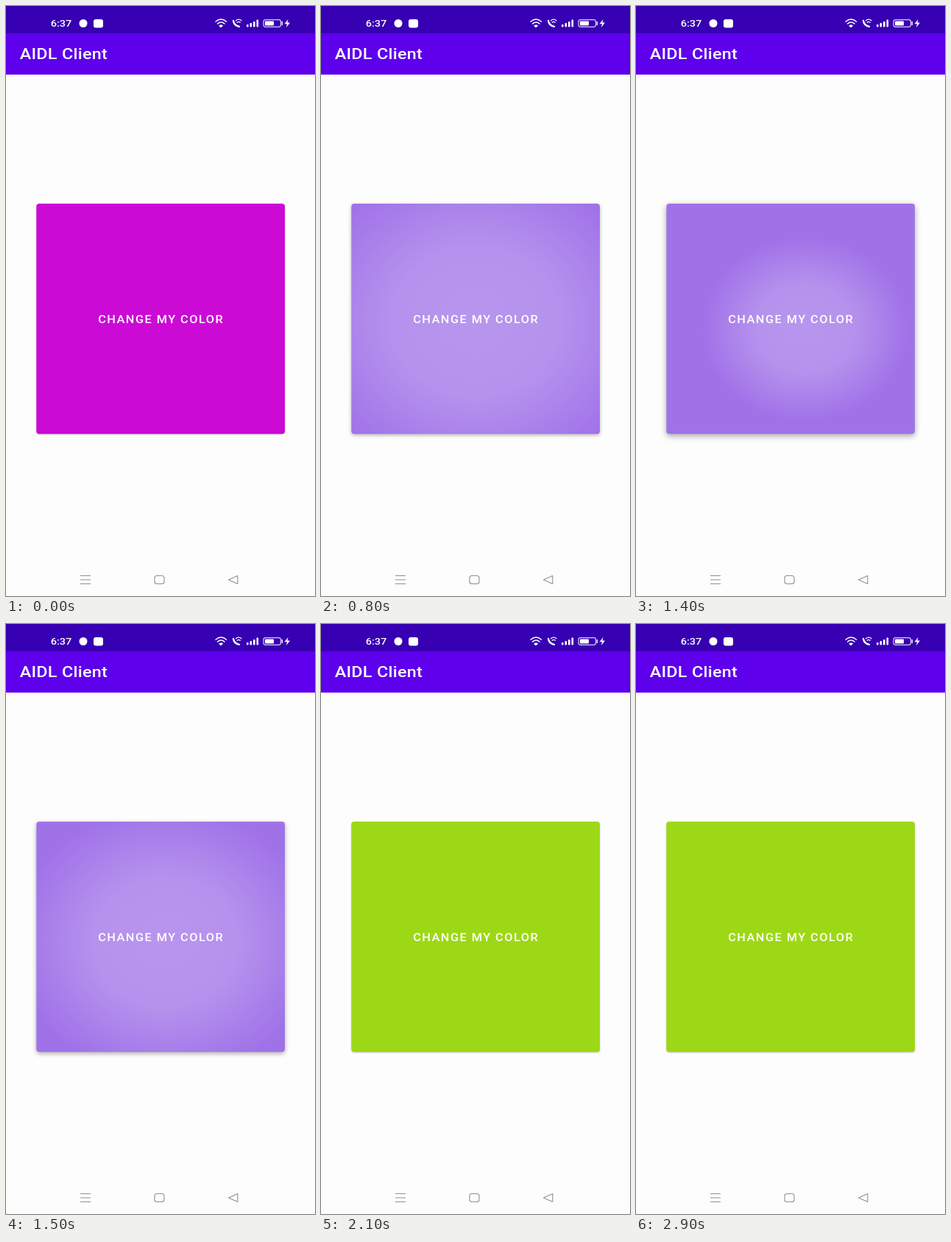
Animation, 420 px wide and 800 px high, one loop 3 s. Source, as an HTML page:

```html
<!DOCTYPE html>
<html lang="en">
<head>
<meta charset="utf-8">
<title>AIDL Client</title>
<style>
  html, body { margin: 0; width: 100%; height: 100%; overflow: hidden; background: #fdfdfd; }
  svg { display: block; width: 100vw; height: 100vh; }
  text { font-family: Roboto, sans-serif; font-weight: 500; fill: #fff; }
  .line { fill: none; stroke: #fff; stroke-width: 1.4; stroke-linecap: round; }
  .nav { fill: none; stroke: #909090; stroke-width: 1.1; stroke-linejoin: round; }
</style>
</head>
<body>
<svg viewBox="0 0 420 800" preserveAspectRatio="none">
  <defs>
    <radialGradient id="glow">
      <stop offset="0" stop-color="#fff"/>
      <stop offset=".48" stop-color="#fff" stop-opacity=".9"/>
      <stop offset="1" stop-color="#fff" stop-opacity="0"/>
    </radialGradient>
    <clipPath id="face"><rect x="41.3" y="268" width="337.7" height="312.2" rx="4"/></clipPath>
    <filter id="soft" x="-10%" y="-10%" width="120%" height="120%"><feGaussianBlur id="blur" stdDeviation="1"/></filter>
  </defs>

  <rect width="420" height="800" fill="#fdfdfd"/>
  <rect width="420" height="37" fill="#3700b3"/>
  <rect y="37" width="420" height="56" fill="#5e00eb"/>

  <!-- status bar -->
  <circle cx="105" cy="23.5" r="5.5" fill="#fff"/>
  <rect x="119" y="18" width="13" height="11.5" rx="3" fill="#fff"/>
  <g class="line">
    <path d="M285 21.3Q292.3 14.9 299.6 21.3M287.5 24.1Q292.3 20 297.1 24.1"/>
    <path d="M290 26.7Q292.3 24.8 294.6 26.7L292.3 28.6Z" fill="#fff" stroke-width="1"/>
    <path d="M309 20Q310 26.5 317 27.8" stroke-width="2.3"/>
    <path d="M312.5 19.8Q316.2 16.6 320 19.8M314.2 22.3Q316.2 20.6 318.2 22.3" stroke-width="1.2"/>
  </g>
  <g id="bars" fill="#fff"></g>
  <rect x="350" y="18.7" width="23.5" height="9.6" rx="2.8" fill="none" stroke="#d8ccf0" stroke-width="1.2"/>
  <rect x="352" y="20.5" width="12" height="6" rx="1" fill="#fff"/>
  <path d="M375.3 21.5v4" class="line"/>
  <path d="M383.5 18L378.5 24.3H382L381 29L386 22.5H382.5Z" fill="#fff"/>

  <!-- the screen is 360 wide, shown at 420 -->
  <g transform="scale(1.16667 1)">
    <text x="52" y="28" font-size="12.5">6:37</text>
    <text x="16" y="72" font-size="20" letter-spacing=".25">AIDL Client</text>
  </g>

  <!-- button -->
  <rect id="shadow" x="41.3" y="268" width="337.7" height="312.2" rx="4" filter="url(#soft)"/>
  <rect id="button" x="41.3" y="268" width="337.7" height="312.2" rx="4"/>
  <g clip-path="url(#face)"><ellipse id="ripple" fill="url(#glow)"/></g>
  <g transform="scale(1.16667 1)">
    <text x="107.3" y="430" font-size="14" letter-spacing="1.25">CHANGE MY COLOR</text>
  </g>

  <!-- navigation -->
  <path class="nav" d="M101 772.5h14M101 778h14M101 783.5h14"/>
  <rect class="nav" x="202" y="772.5" width="13" height="11" rx="3"/>
  <path class="nav" d="M302.5 778L314.8 772.5V783.5Z"/>
</svg>
<script>
const LOOP = 3000, STEP = 100;
const PRESSES = [500, 1250];
const COLORS = [[0, '#cc0ad6'], [700, '#a072e8'], [1600, '#9dd816']];

const $ = id => document.getElementById(id);
const clamp = v => Math.max(0, Math.min(1, v));
const set = (id, attrs) => {
  for (const key in attrs) $(id).setAttribute(key, attrs[key]);
};

$('bars').innerHTML = [3.5, 5.5, 7.5, 10].map((h, i) =>
  `<rect x="${327 + i * 4.5}" y="${28.5 - h}" width="2.6" height="${h}" rx=".9"/>`).join('');

function draw(t) {
  const color = COLORS.filter(c => c[0] <= t).pop()[1];
  const press = PRESSES.filter(p => p <= t).pop();
  const age = press === undefined ? LOOP : t - press;

  const grow = clamp(age / 300);
  const radius = 40 + age * 0.63;
  const alpha = 0.25 * clamp((530 - age) / 200);
  const lift = clamp((age + 50) / 100) * clamp((400 - age) / 200);

  set('button', { fill: color });
  set('ripple', {
    cx: 250 - 40 * grow, cy: 448 - 20 * grow,
    rx: radius * 1.04, ry: radius * 0.93, opacity: alpha
  });
  set('shadow', { y: 268.8 + 2 * lift, opacity: 0.25 + 0.1 * lift });
  set('blur', { stdDeviation: 1 + 3 * lift });
}

let shown = -1;
const start = performance.now();
function tick(now) {
  const t = Math.floor(Math.max(0, now - start) % LOOP / STEP) * STEP;
  if (t !== shown) draw(shown = t);
  requestAnimationFrame(tick);
}
draw(0);
requestAnimationFrame(tick);
</script>
</body>
</html>
```
